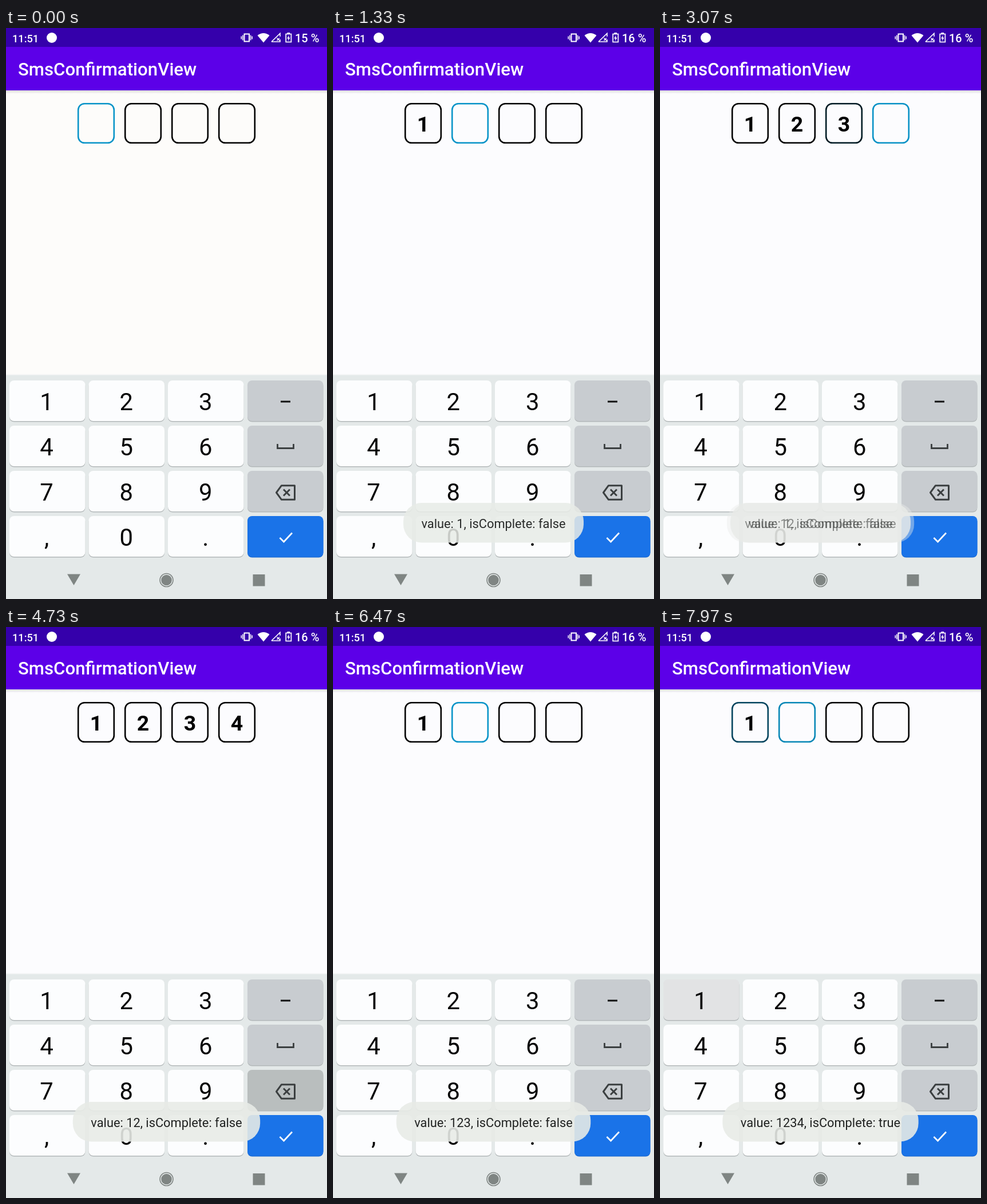
An HTML page with a canvas that plays this animation: 561 by 998 pixels, repeating every 8000 ms.

```html
<!DOCTYPE html>
<html lang="en">
<head>
<meta charset="utf-8">
<title>SmsConfirmationView</title>
<style>
  html, body { margin: 0; width: 100%; height: 100%; overflow: hidden; background: #fcfcfe; }
  canvas { display: block; width: 561px; height: 998px; }
</style>
</head>
<body>
<canvas id="stage"></canvas>
<script>
const W = 561, H = 998, LOOP = 8000;
const canvas = document.getElementById('stage');
const ctx = canvas.getContext('2d');
const ratio = window.devicePixelRatio || 1;
canvas.width = W * ratio;
canvas.height = H * ratio;

const FONT = 'Roboto, sans-serif';
const ACCENT = [8, 148, 200];
const FADE = 300, TOAST_FADE = 500;
const COLS = [6, 144.5, 283, 422], ROWS = [616, 695, 774, 853];
const KEYS = ['123-', '456_', '789<', ',0.>'];

// Key presses: [key, down, commit, up, digits entered afterwards]
const PRESSES = [
  ['1', 830, 930, 1210, 1],
  ['2', 1770, 1900, 2150, 2],
  ['3', 2670, 2800, 3050, 3],
  ['4', 3500, 3630, 3880, 4],
  ['<', 4730, 4830, 4860, 3],
  ['<', 5430, 5530, 5530, 2],
  ['<', 6030, 6165, 6200, 1],
  ['<', 6730, 6840, 6870, 0],
  ['1', 7630, 7757, 8010, 1]
];

const TOASTS = [
  [930, 'value: 1, isComplete: false'],
  [2930, 'value: 12, isComplete: false'],
  [5030, 'value: 123, isComplete: false'],
  [6930, 'value: 1234, isComplete: true']
];

const clamp = v => Math.min(1, Math.max(0, v));

function text(str, x, y, size, color, weight = 400, align = 'center') {
  ctx.font = `${weight} ${size}px ${FONT}`;
  ctx.textAlign = align;
  ctx.fillStyle = color;
  ctx.fillText(str, x, y);
}

function rect(x, y, w, h, color) {
  ctx.fillStyle = color;
  ctx.fillRect(x, y, w, h);
}

function round(x, y, w, h, r, color) {
  ctx.beginPath();
  ctx.roundRect(x, y, w, h, r);
  ctx.fillStyle = color;
  ctx.fill();
}

function path(points, closed) {
  ctx.beginPath();
  points.forEach(([x, y]) => ctx.lineTo(x, y));
  if (closed) ctx.closePath();
}

function line(points, color, width, closed) {
  path(points, closed);
  ctx.strokeStyle = color;
  ctx.lineWidth = width;
  ctx.stroke();
}

function area(points, color) {
  path(points, true);
  ctx.fillStyle = color;
  ctx.fill();
}

function disc(x, y, r, color) {
  ctx.beginPath();
  ctx.arc(x, y, r, 0, 7);
  ctx.fillStyle = color;
  ctx.fill();
}

function statusBar(t) {
  const c = '#fff';
  rect(0, 0, W, 33, '#3500ab');
  text('11:51', 11, 24.5, 18.2, c, 500, 'left');
  disc(80, 17, 9, c);

  // vibrate
  ctx.strokeStyle = c;
  ctx.lineWidth = 2;
  ctx.strokeRect(416.5, 10.5, 8.5, 13);
  for (const s of [-1, 1]) {
    line([[420.7 + s * 6.8, 12.5], [420.7 + s * 6.8, 21.5]], c, 1.6);
    line([[420.7 + s * 9.4, 14.5], [420.7 + s * 9.4, 19.5]], c, 1.6);
  }

  // wifi
  ctx.beginPath();
  ctx.moveTo(450, 25.5);
  ctx.lineTo(439.5, 13);
  ctx.quadraticCurveTo(450, 5, 460.5, 13);
  ctx.fillStyle = c;
  ctx.fill();

  // mobile signal
  line([[464, 24], [479, 24], [479, 20]], c, 1.6);
  line([[464, 24], [479, 9.5], [479, 15]], c, 1.6);
  line([[473.5, 17.5], [478, 22]], c, 1.5);
  line([[478, 17.5], [473.5, 22]], c, 1.5);

  // battery
  rect(491.5, 8, 4.5, 3, c);
  ctx.strokeStyle = c;
  ctx.lineWidth = 1.7;
  ctx.strokeRect(489.2, 10.5, 9.2, 14);
  area([[494.6, 12.5], [491, 18.5], [493.4, 18.5], [493, 22.8], [496.6, 16.8], [494.2, 16.8]], c);

  text((t < 500 ? 15 : 16) + ' %', 505, 25, 20, c, 500, 'left');
}

function appBar() {
  const shade = ctx.createLinearGradient(0, 109, 0, 115);
  shade.addColorStop(0, 'rgba(0,0,0,.13)');
  shade.addColorStop(1, 'rgba(0,0,0,0)');
  rect(0, 109, W, 6, shade);
  rect(0, 33, W, 76, '#5c00e8');
  text('SmsConfirmationView', 21, 83, 31.2, '#fff', 500, 'left');
}

function codeBoxes(t) {
  let prev = 0, count = 0, since = -FADE;
  for (const [, , commit, , total] of PRESSES) {
    if (t < commit) break;
    prev = count;
    count = total;
    since = commit;
  }
  const k = (1 - Math.cos(Math.PI * clamp((t - since) / FADE))) / 2;
  for (let i = 0; i < 4; i++) {
    const mix = (i === prev) * (1 - k) + (i === count) * k;
    // blend in linear light
    const rgb = ACCENT.map(v => Math.round(v * Math.pow(mix, 1 / 2.2)));
    const x = 126.2 + 82 * i;
    ctx.beginPath();
    ctx.roundRect(x, 132.2, 62.6, 68.6, 11);
    ctx.strokeStyle = `rgb(${rgb})`;
    ctx.lineWidth = 2.6;
    ctx.stroke();
    if (i < count) text(i + 1, x + 31.3, 181, 37.4, '#000', 700);
  }
}

function keyIcon(key, x, y) {
  const ink = '#3b3f40';
  if (key === '-') rect(x - 8.5, y - 1.5, 17, 3, '#111');
  if (key === '_') line([[x - 14, y - 5], [x - 14, y + 2.5], [x + 14, y + 2.5], [x + 14, y - 5]], ink, 2.8);
  if (key === '<') {
    const b = y + 1;
    ctx.lineJoin = 'round';
    line([[x - 16, b], [x - 7, b - 12.3], [x + 16, b - 12.3], [x + 16, b + 12.3], [x - 7, b + 12.3]], ink, 3, true);
    ctx.lineJoin = 'miter';
    line([[x - 3.5, b - 5.5], [x + 7.5, b + 5.5]], ink, 3);
    line([[x + 7.5, b - 5.5], [x - 3.5, b + 5.5]], ink, 3);
  }
  if (key === '>') line([[x - 10, y + 1], [x - 3, y + 8], [x + 11.5, y - 7.5]], '#fff', 2.7);
}

function keyboard(t) {
  rect(0, 606, W, H - 606, '#e4e9e9');
  rect(0, 605.5, W, 1.5, '#eff2f2');
  const down = PRESSES.find(p => t >= p[1] && t < p[3]);
  ROWS.forEach((y, r) => COLS.forEach((x, c) => {
    const key = KEYS[r][c];
    const held = down && down[0] === key;
    let fill = held ? '#e2e3e4' : '#fcfdfe';
    if (c === 3) fill = held ? '#b9bebe' : '#c8ccd0';
    if (key === '>') fill = '#1a73e8';
    const edge = key === '>' ? '#1a6bd6' : '#b3b8b9';
    round(x, y + 1.5, 132.5, 71, 8, edge);
    round(x, y, 132.5, 71, 8, fill);
    if (c === 3) keyIcon(key, x + 66.5, y + 37);
    else text(key, x + (c ? 65.8 : 65), y + 52, 41.8, '#050505');
  }));
}

function navBar() {
  const c = '#7f8583';
  area([[107, 954.5], [130, 954.5], [118.5, 974]], c);
  disc(280.5, 965, 9.3, c);
  ctx.beginPath();
  ctx.arc(280.5, 965, 11.5, 0, 7);
  ctx.strokeStyle = c;
  ctx.lineWidth = 1.6;
  ctx.stroke();
  rect(431.5, 955, 21, 20.5, c);
}

function toasts(t) {
  TOASTS.forEach(([start, label], i) => {
    if (t < start) return;
    const next = TOASTS[i + 1];
    const enter = 1 - Math.pow(1 - clamp((t - start) / TOAST_FADE), 2);
    const leave = next ? 1 - Math.pow(clamp((t - next[0]) / TOAST_FADE), 2) : 1;
    ctx.globalAlpha = enter * leave;
    ctx.font = `400 21.8px ${FONT}`;
    const w = ctx.measureText(label).width + 63;
    round(W / 2 - w / 2, 830, w, 69.5, 32, 'rgba(232,235,231,.89)');
    text(label, W / 2, 873.5, 21.8, '#202221');
    ctx.globalAlpha = 1;
  });
}

function draw(t) {
  ctx.setTransform(ratio, 0, 0, ratio, 0, 0);
  rect(0, 0, W, H, t < 500 ? '#fdfcfa' : '#fcfcfe');
  statusBar(t);
  appBar();
  codeBoxes(t);
  keyboard(t);
  navBar();
  toasts(t);
}

const begin = performance.now();
function tick() {
  draw((performance.now() - begin) % LOOP);
  requestAnimationFrame(tick);
}
tick();
</script>
</body>
</html>
```
